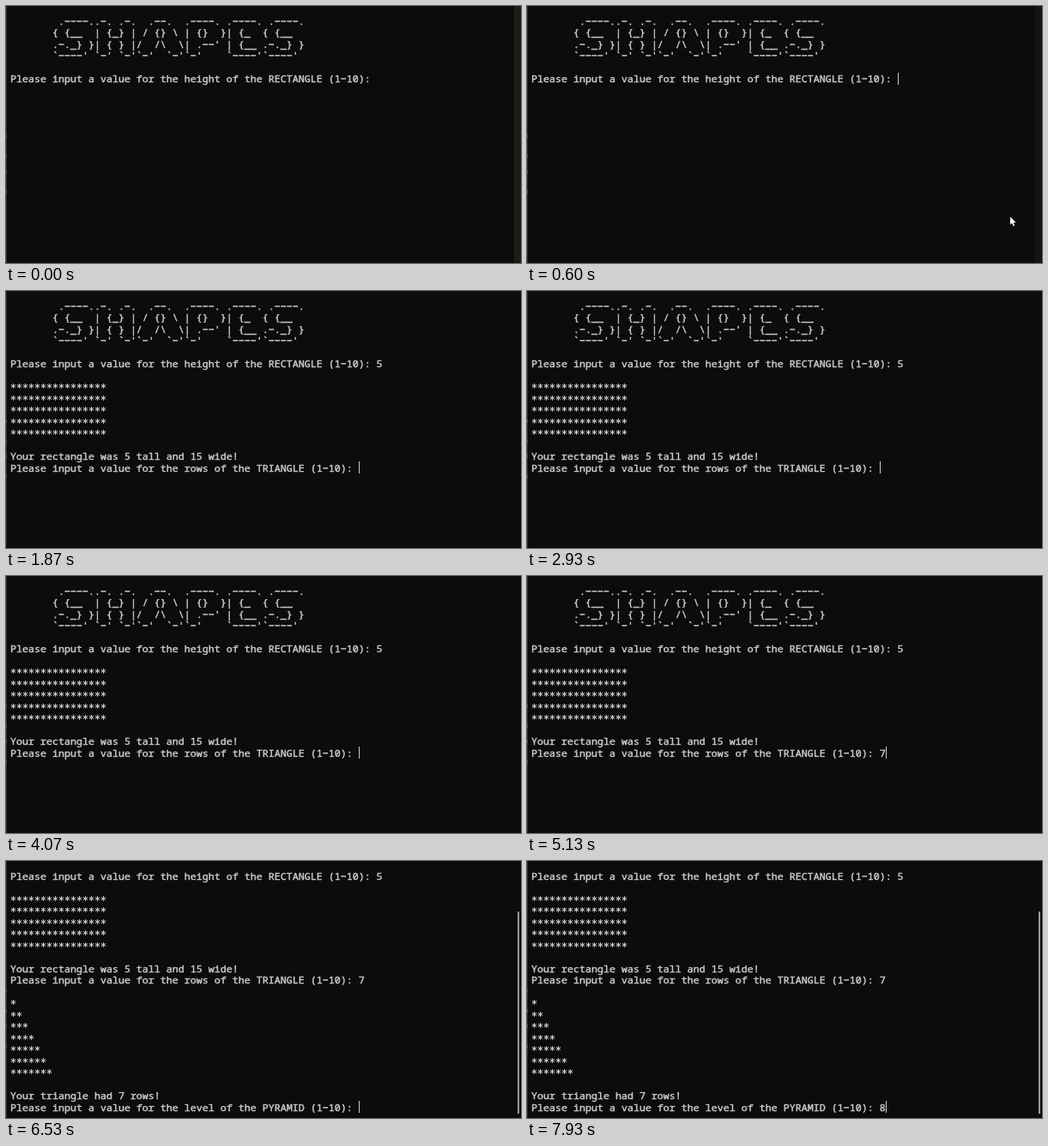
Animation of 600 by 300 pixels, one loop 8000 ms. Source, as an HTML page with a canvas:

```html
<!DOCTYPE html>
<html lang="en">
<head>
<meta charset="utf-8">
<title>Shapes console</title>
<style>
  html, body { margin: 0; width: 600px; height: 300px; overflow: hidden; background: #0c0c0c; }
  canvas { display: block; }
</style>
</head>
<body>
<canvas id="stage" width="600" height="300"></canvas>
<script>
const ctx = document.getElementById('stage').getContext('2d');
const LOOP = 8000, LEFT = 5, TOP = 10.9, CELL = 7, ROW = 13.5;
const INK = '#cccccc', PAPER = '#0c0c0c';
const TEXT_FONT = '500 11.667px "Noto Sans Mono", monospace';
const STAR_FONT = 'bold 11.63px "DejaVu Sans Mono", monospace';

const BANNER = [
  '        .----..-. .-.  .--.  .----. .----. .----.',
  '       { {__  | {_} | / {} \\ | {}  }| {_  { {__',
  '       .-._} }| { } |/  /\\  \\| .--\' | {__ .-._} }',
  '       `----\' `-\' `-\'`-\'  `-\'`-\'    `----\'`----\'',
  ''
];
const ask = what => `Please input a value for the ${what} (1-10): `;

// Times of key presses and of the caret switching on or off.
const KEY = { five: 1400, enter: 1730, seven: 5130, enter2: 5400, eight: 7930 };
const CARET = [330, 930, 1400, 2400, 2930, 3530, 4070, 4600, 5130, 6000, 6530, 7130, 7670];
const POINTER = [
  [70, 577, 274], [130, 576, 268], [200, 572, 260], [270, 566, 252], [330, 560, 248],
  [470, 554, 246], [530, 559, 246], [600, 563, 246]
];

function screenLines(t) {
  const lines = [...BANNER, ask('height of the RECTANGLE') + (t >= KEY.five ? '5' : '')];
  if (t >= KEY.enter) {
    lines.push('', ...Array(5).fill('*'.repeat(16)), '', 'Your rectangle was 5 tall and 15 wide!',
      ask('rows of the TRIANGLE') + (t >= KEY.seven ? '7' : ''));
  }
  if (t >= KEY.enter2) {
    lines.push('', ...Array.from({ length: 7 }, (_, i) => '*'.repeat(i + 1)), '', 'Your triangle had 7 rows!',
      ask('level of the PYRAMID') + (t >= KEY.eight ? '8' : ''));
  }
  return lines;
}

function box(color, x, y, w, h) {
  ctx.fillStyle = color;
  ctx.fillRect(x, y, w, h);
}

function drawText(lines, scroll) {
  ctx.fillStyle = ctx.strokeStyle = INK;
  ctx.lineWidth = 0.45;
  ctx.lineJoin = 'round';
  lines.forEach((line, i) => {
    // Console glyphs are semi-bold, with wide dashes and low asterisks.
    const stars = line[0] === '*';
    const y = Math.round(TOP + (i - scroll) * ROW + 10.6) + (stars ? 1.3 : 0);
    const text = line.replace(/-/g, '−');
    ctx.font = stars ? STAR_FONT : TEXT_FONT;
    ctx.fillText(text, LEFT, y);
    if (!stars) ctx.strokeText(text, LEFT, y);
  });
}

function drawPointer(t) {
  const spot = POINTER.filter(p => p[0] <= t).pop();
  if (!spot || t >= KEY.five) return;
  ctx.save();
  ctx.translate(spot[1], spot[2]);
  ctx.fillStyle = '#ffffff';
  ctx.fill(new Path2D('M0 0V9.2L2.1 7.3L3.7 11L5.3 10.3L3.7 6.7H6.6Z'));
  ctx.restore();
}

function draw(t) {
  box(PAPER, 0, 0, 600, 300);
  box('#303030', 0, 0, 1, 300);
  for (const y of [150, 173, 191, 215]) box('#555555', 0, y, 1, 4);

  ctx.globalAlpha = Math.max(0, Math.min(1, (670 - t) / 130));
  box('#1e1c19', 592, 0, 8, 300);
  ctx.globalAlpha = 1;
  if (t >= 5470) box('#9a9a9a', 596, 59, 2, 236);

  const lines = screenLines(t);
  const scroll = t >= KEY.enter2 ? 5 : 0;
  drawText(lines, scroll);

  if (CARET.filter(time => time <= t).length % 2) {
    const row = lines.length - 1;
    box(INK, LEFT + lines[row].length * CELL, Math.floor(TOP + (row - scroll) * ROW), 1, 14);
  }
  drawPointer(t);
}

function tick() {
  draw(performance.now() % LOOP);
  requestAnimationFrame(tick);
}
tick();
</script>
</body>
</html>
```
